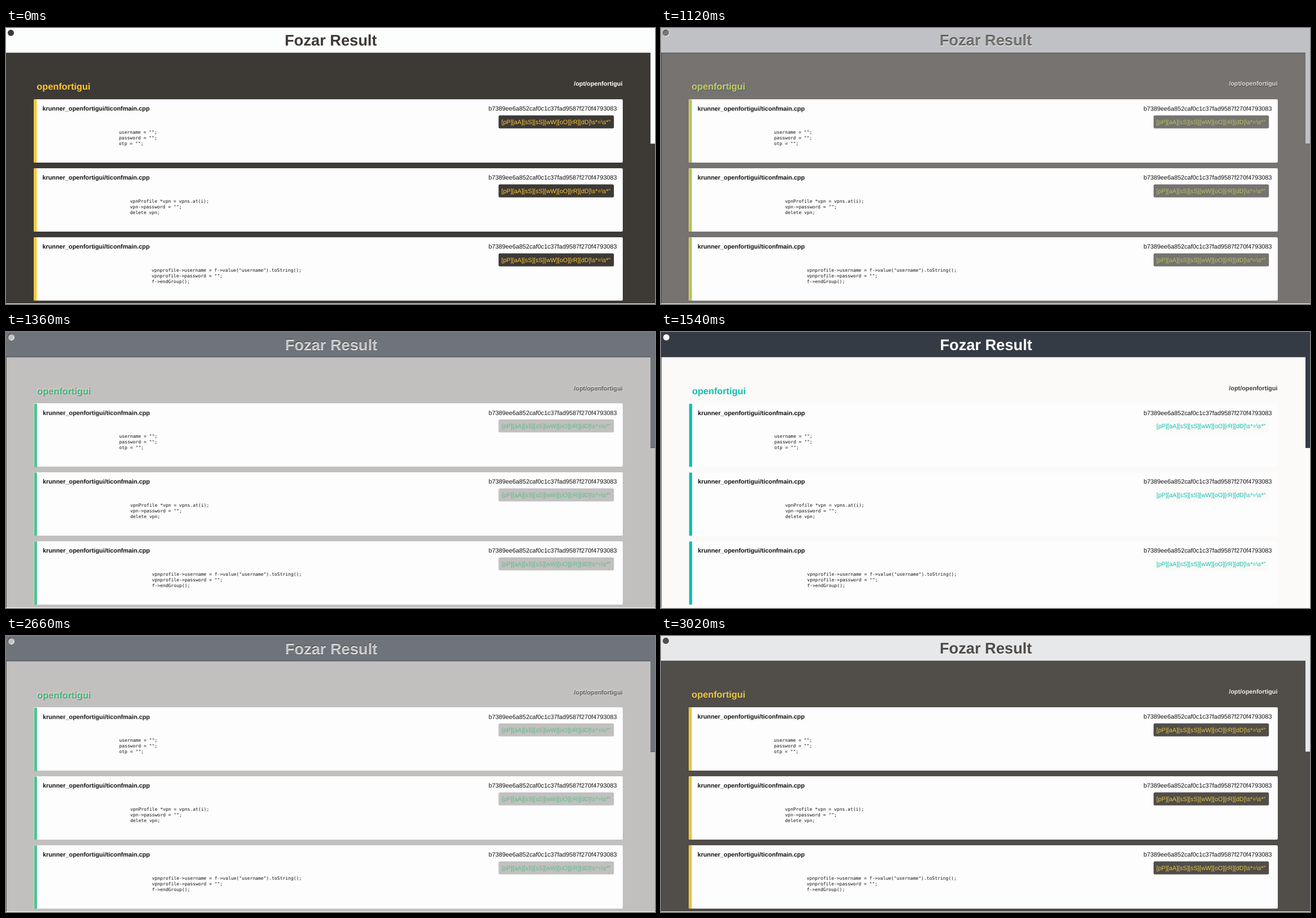
These frames come from a looping animation (1148 by 488 pixels, 3.08 s). An HTML page:

```html
<!DOCTYPE html>
<html lang="en">
<head>
<meta charset="utf-8">
<title>Scan result themes</title>
<style>
  html, body { margin: 0; width: 100%; height: 100%; overflow: hidden; background: #fff; }
  svg { display: block; width: 1148px; height: 488px; }
  text { font: 10.83px "Liberation Sans", Arial, sans-serif; text-rendering: geometricPrecision; }
  .bold { font-weight: bold; }
  .end { text-anchor: end; }
  .title { font-size: 27.2px; }
  .project { font-size: 16.3px; }
  .code { font: 8px "DejaVu Sans Mono", monospace; white-space: pre; }
  .page { --card: #fdfdfd; }
  #warm { --bg: #3d3935; --bar: #fcfdfd; --title: #3d3935; --accent: #ffc734; --path: #fff; }
  #cool { --bg: #fbfaf8; --bar: #343b45; --title: #fff; --accent: #0fbfb0; --path: #3d3d3d; }
</style>
</head>
<body>
<svg viewBox="0 0 1148 488">
  <g id="warm" class="page"></g>
  <g id="cool" class="page" transform="matrix(.9993 0 0 .9985 .8 .9)"></g>
</svg>
<script>
const FILE = 'krunner_openfortigui/ticonfmain.cpp';
const HASH = 'b7389ee6a852caf0c1c37fad9587f270f4793083';
const RULE = '[pP][aA][sS][sS][wW][oO][rR][dD]\\s*=\\s*"';
const findings = [
  [199.8, 'username = "";', 'password = "";', 'otp = "";'],
  [219.3, 'vpnProfile *vpn = vpns.at(i);', 'vpn->password = "";', 'delete vpn;'],
  [257.8, 'vpnprofile->username = f->value("username").toString();',
    'vpnprofile->password = "";', 'f->endGroup();'],
];

const escape = s => s.replace(/&/g, '&amp;').replace(/</g, '&lt;').replace(/>/g, '&gt;');
const rect = (x, y, w, h, fill, r = 0) =>
  `<rect x="${x}" y="${y}" width="${w}" height="${h}" rx="${r}" fill="var(--${fill})"/>`;
const label = (x, y, s, cls = '', fill = 'ink') =>
  `<text x="${x}" y="${y}" class="${cls}" fill="var(--${fill}, #111)">${escape(s)}</text>`;

function card([x, ...lines], i) {
  const y = 126 + i * 122;
  return rect(49, y, 1042, 112, 'card', 2) +
    rect(49, y, 5.3, 112, 'accent', 1.5) +
    label(64.5, y + 20, FILE, 'bold') +
    label(1080.5, y + 20, HASH, 'end') +
    rect(871.3, y + 28.5, 204, 23, 'bg', 2.5) +
    label(876.3, y + 43.5, RULE, '', 'accent') +
    lines.map((s, n) => label(x, y + 60.5 + n * 10, s, 'code')).join('');
}

const page =
  rect(0, 0, 1150, 490, 'bg') +
  rect(-2, -2, 1152, 45.7, 'bar') +
  rect(1140, -2, 10, 206.5, 'bar') +
  '<circle cx="8.6" cy="8.6" r="5.5" fill="var(--title)"/>' +
  label(493, 31, 'Fozar Result', 'bold title', 'title') +
  label(54.3, 109, 'openfortigui', 'bold project', 'accent') +
  label(1090.5, 102, '/opt/openfortigui', 'bold end', 'path') +
  findings.map(card).join('');

const warm = document.getElementById('warm');
const cool = document.getElementById('cool');
warm.innerHTML = page + rect(0, 487, 1148, 1, 'path');
cool.innerHTML = page;

// Each theme holds for a second, then fades in nine steps of 60 ms.
const HALF = 1540;
const fade = t => Math.min(10, Math.max(0, Math.floor((t - 1000) / 60) + 1)) / 10;

function draw(now) {
  const t = now % (2 * HALF);
  cool.setAttribute('opacity', t < HALF ? fade(t) : 1 - fade(t - HALF));
  requestAnimationFrame(draw);
}
draw(0);
</script>
</body>
</html>
```
